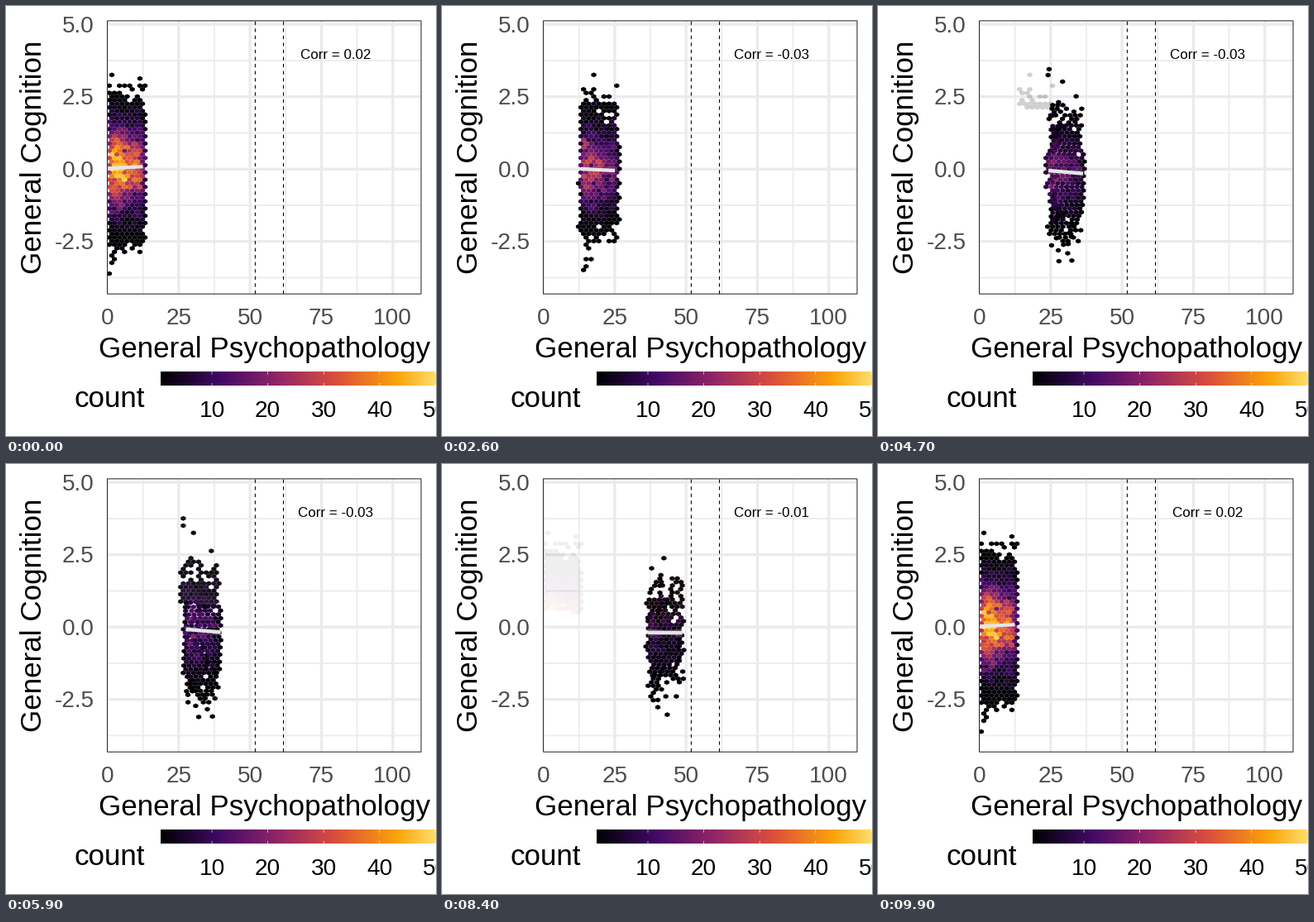
Recreate the animation shown at these times as a matplotlib script. Size 520 px wide and 520 px high, loop 10000 ms.

```python
import numpy as np
import matplotlib as mpl
import matplotlib.pyplot as plt
from matplotlib.animation import FuncAnimation
from matplotlib.collections import PolyCollection
from matplotlib.colors import LinearSegmentedColormap
from matplotlib.patches import Rectangle

SIZE, DPI = 520, 100
PT = 72 / DPI
LEFT, RIGHT, TOP, BOTTOM = 122.5, 502, 17.9, 348.2
X_UNIT, Y_UNIT, Y_ZERO = 3.453, 35.0, 197.2

plt.rcParams["font.family"] = "Liberation Sans"
plt.rcParams["path.snap"] = False
INFERNO = LinearSegmentedColormap.from_list(
    "inferno6", mpl.colormaps["inferno"](np.linspace(0, 1, 6)), N=512)


def px(x):
    return LEFT + X_UNIT * x


def py(y):
    return Y_ZERO - Y_UNIT * y


# hexagon lattice, in pixels
COL, ROW = 6.17, 4.37
X0, Y0 = 124.9, 65.8
MID_ROW = 30
ANGLE = np.radians(np.arange(30, 390, 60))
HEX = np.column_stack([np.cos(ANGLE) * COL / np.sqrt(3), np.sin(ANGLE) * ROW / 1.5])

BAND = 12.9  # width of one slice of the x axis

# cells below and above the middle row, mean height, row limits,
# far cells (row, column)
STATES = [
    dict(low=165, high=165, mid=194.5, rows=(7, 56), label="0.02",
         far=[(4, 0), (5, 6), (7, 2), (7, 6), (55, 1), (56, 0), (59, 0)]),
    dict(low=150, high=152, mid=197.5, rows=(6, 56), label="-0.03",
         far=[(4, 9), (58, 7), (57, 8)]),
    dict(low=150, high=128, mid=201, rows=(10, 53), label="-0.03",
         far=[(0, 14), (2, 14), (4, 16), (9, 20), (55, 17), (55, 20)]),
    dict(low=113, high=87, mid=205, rows=(12, 53), label="-0.01",
         far=[(10, 24), (54, 25)]),
]

# fitted line: x0, y0, x1, y1, half width of the ribbon at ends and middle
FITS = np.array([
    [122.7, 196.3, 165.5, 194.2, 1.6, 1.2],
    [168, 197.0, 209, 199.0, 2.4, 1.6],
    [215, 199.5, 257, 203.4, 3.4, 2.2],
    [257, 204.3, 299, 204.8, 5.2, 3.2],
])

# first and last frame of each move to the next state
MOVES = [(8, 26), (34, 50), (58, 74), (83, 99)]


def make_cells(k, state, rng):
    row, col = np.mgrid[0:62, 0:32].reshape(2, -1)
    x = X0 + COL * (col + 0.5 * (row % 2 == 0))
    y = Y0 + ROW * row
    lo, hi = px(BAND * k) + 1, px(BAND * (k + 1))
    share = np.clip(np.minimum(x + COL / 2, hi) - np.maximum(x - COL / 2, lo), 0, COL) / COL
    level = 46 * np.exp(-np.maximum(0, x - 136) / 65)
    mean = share * level * np.exp(-0.5 * ((y - state["mid"]) / 31.5) ** 2)

    # rank cells by the chance of holding at least one point
    score = mean / rng.exponential(size=mean.size)
    first, last = state["rows"]
    score[(row < first) | (row > last)] = 0
    for r, c in state["far"]:
        score[(row == r) & (col == c)] = np.inf
    order = np.argsort(-score)
    below = row[order] > MID_ROW
    keep = np.r_[order[below][:state["low"]], order[~below][:state["high"]]]
    keep = keep[np.lexsort((x[keep], -row[keep]))]

    count = np.maximum(1, rng.poisson(mean[keep]))
    color = INFERNO(np.clip((count - 1) / 53, 0, 1))
    return np.column_stack([x[keep], y[keep]]), color


rng = np.random.default_rng(12)
CELLS = [make_cells(k, s, rng) for k, s in enumerate(STATES)]

fig = plt.figure(figsize=(SIZE / DPI, SIZE / DPI), dpi=DPI, facecolor="white")
ax = fig.add_axes([0, 0, 1, 1])
ax.axis("off")


def text(x, y, s, size, color="black", ha="center", **kw):
    return ax.text(x, y, s, fontsize=size * PT, color=color, ha=ha, va="baseline", **kw)


def line(xs, ys, color, width, **kw):
    return ax.plot(xs, ys, color=color, lw=width * PT, solid_capstyle="butt", **kw)[0]


# legend bar
ax.imshow(np.linspace(0, 1, 400)[None], cmap=INFERNO, aspect="auto",
          extent=(187, 546, 459.3, 442.3), interpolation="bilinear")
for v in range(10, 60, 10):
    x = 249 + 6.76 * (v - 10)
    for y in (442.3, 455.9):
        line([x, x], [y, y + 3.4], "white", 0.6)
    text(x, 496.8, str(v), 28, clip_on=True)
text(83, 485.3, "count", 35, ha="left")

ax.set_xlim(0, SIZE)
ax.set_ylim(SIZE, 0)

panel = Rectangle((LEFT, TOP), RIGHT - LEFT, BOTTOM - TOP, fc="none",
                  ec="#333333", lw=1.1 * PT, zorder=9)
ax.add_patch(panel)


def clipped(artist):
    artist.set_clip_path(panel)
    return artist


# grid
for width, xs, ys in ((1.7, np.arange(12.5, 110, 25), np.arange(-3.75, 5, 2.5)),
                      (3.3, np.arange(0, 110, 25), np.arange(-2.5, 5.1, 2.5))):
    for x in xs:
        clipped(line([px(x)] * 2, [BOTTOM, TOP], "#EBEBEB", width, zorder=1))
    for y in ys:
        clipped(line([LEFT, RIGHT], [py(y)] * 2, "#EBEBEB", width, zorder=1))

for x in (301.4, 335.5):
    ax.plot([x, x], [BOTTOM, TOP], color="black", lw=1.07 * PT, zorder=6,
            dashes=(4, 4), dash_capstyle="butt")

# axis text
for x in range(0, 101, 25):
    text(px(x), 384.8, str(x), 28, "#4D4D4D")
for y in (-2.5, 0, 2.5, 5):
    text(106.7, py(y) + 9.7, f"{y:.1f}", 28, "#4D4D4D", ha="right")
text(312.5, 425.3, "General Psychopathology", 35)
text(42.6, 183, "General Cognition", 35, rotation=90, rotation_mode="anchor")

fading = clipped(ax.add_collection(PolyCollection([], lw=0, zorder=3), autolim=False))
moving = clipped(ax.add_collection(PolyCollection([], lw=0, zorder=4), autolim=False))
ribbon = clipped(ax.add_collection(
    PolyCollection([], lw=0, fc="#999999", alpha=0.4, zorder=5), autolim=False))
fit = clipped(line([], [], "#E5E5E5", 4.3, zorder=5.5))
label = text(398.7, 64, "", 17, zorder=7)


def set_hexes(coll, centers, colors):
    coll.set_verts(centers[:, None, :] + HEX)
    coll.set_facecolor(colors)


def phase(n):
    """State, next state and progress between them."""
    for k, (start, end) in enumerate(MOVES):
        if n <= end:
            return k, (k + 1) % 4, max(0.0, (n - start) / (end - start))
    return 0, 1, 0.0


def draw(n):
    a, b, p = phase(n)
    (xy_a, col_a), (xy_b, col_b) = CELLS[a], CELLS[b]
    m = min(len(xy_a), len(xy_b))
    set_hexes(moving, (1 - p) * xy_a[:m] + p * xy_b[:m],
              (1 - p) * col_a[:m] + p * col_b[:m])

    # unmatched cells fade in place
    if len(xy_a) > m:
        spare, tint, alpha = xy_a[m:], col_a[m:].copy(), 1 - p
    else:
        spare, tint, alpha = xy_b[m:], col_b[m:].copy(), p
    tint[:, 3] = alpha
    set_hexes(fading, spare, tint)

    x0, y0, x1, y1, wide, thin = (1 - p) * FITS[a] + p * FITS[b]
    t = np.linspace(0, 1, 21)
    x, y = x0 + (x1 - x0) * t, y0 + (y1 - y0) * t
    half = thin + (wide - thin) * (2 * t - 1) ** 2
    ribbon.set_verts([np.column_stack([np.r_[x, x[::-1]],
                                       np.r_[y - half, (y + half)[::-1]]])])
    fit.set_data([x0, x1], [y0, y1])
    label.set_text("Corr = " + STATES[b if p >= 0.5 else a]["label"])
    return moving, fading, ribbon, fit, label


anim = FuncAnimation(fig, draw, frames=100, init_func=lambda: draw(0),
                     interval=100, repeat=True, repeat_delay=0, blit=False)
plt.show()
```
